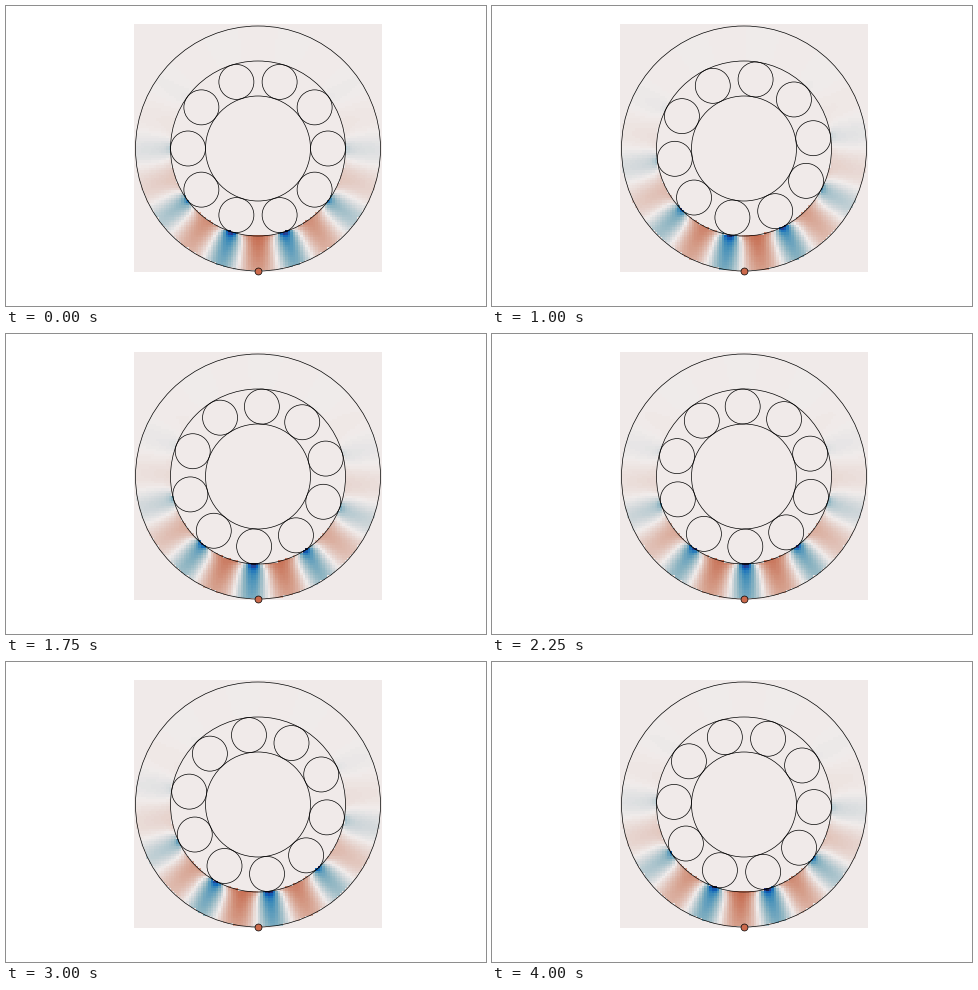
These frames come from a looping animation (480 px wide and 300 px high, 4.25 s). A matplotlib script:

```python
import numpy as np
import matplotlib.pyplot as plt
from matplotlib.animation import FuncAnimation
from matplotlib.colors import LinearSegmentedColormap
from matplotlib.patches import Circle

FRAMES, INTERVAL = 17, 250
BALLS = 10
R_IN, R_PITCH, R_RACE, R_OUT = 3, 4, 5, 7   # in ball radii
UNIT = 17.5                                 # pixels per ball radius
CX, CY = 252, 142.5                         # bearing centre in pixels
W, H = 480, 300
N = 100

STOPS = [
    (0, (23, 28, 66)), (1, (41, 58, 143)), (2, (11, 102, 189)),
    (3, (69, 144, 185)), (4, (142, 181, 194)), (5, (210, 216, 219)),
    (5.5, (241, 236, 235)), (6, (230, 210, 204)), (7, (213, 157, 137)),
    (8, (196, 101, 72)), (9, (172, 43, 36)), (10, (120, 14, 40)),
    (11, (60, 9, 17)),
]
balance = LinearSegmentedColormap.from_list(
    "balance", [(p / 11, [c / 255 for c in rgb]) for p, rgb in STOPS], N=256)

axis = np.linspace(-R_OUT, R_OUT, N)
X, Y = np.meshgrid(axis, axis)
R, THETA = np.hypot(X, Y), np.arctan2(Y, X)
RING = (R >= R_RACE) & (R <= R_OUT)
DEPTH = np.clip((R - R_RACE) / (R_OUT - R_RACE), 0, 1)

# load zone centred on the bottom of the outer ring
FROM_BOTTOM = np.degrees(np.arctan2(X, -Y))
LOAD = np.exp(-0.5 * (FROM_BOTTOM / 46) ** 2)
AMP = (0.43 - 0.16 * DEPTH) * LOAD
PEAK = 0.1 + 0.42 * np.exp(-DEPTH / 0.12)   # sharpness near the contact


def strain(phase):
    c = np.cos(BALLS * (THETA - phase))
    wave = (1 + PEAK) * (c - PEAK) / (1 - 2 * PEAK * c + PEAK ** 2)
    return np.where(RING, -AMP * wave, 0)


fig = plt.figure(figsize=(W / 100, H / 100), dpi=100, facecolor="white")
ax = fig.add_axes([0, 0, 1, 1])
ax.axis("off")

half = R_OUT * N / (N - 1)
field = ax.imshow(strain(0), cmap=balance, vmin=-1, vmax=1, origin="lower",
                  extent=(-half, half, -half, half), aspect="auto",
                  interpolation="nearest")
ax.set_xlim(-CX / UNIT, (W - CX) / UNIT)
ax.set_ylim((CY - H) / UNIT, CY / UNIT)


def ring(radius):
    return ax.add_patch(Circle((0, 0), radius, fill=False, ec="black", lw=0.5))


for radius in (R_IN, R_RACE, R_OUT):
    ring(radius)
balls = [ring(1) for _ in range(BALLS)]
ax.plot(0, -R_OUT, "o", ms=5, mfc="#cb6a4c", mec="black", mew=0.5,
        clip_on=False, zorder=5)


def update(i):
    phase = 2 * np.pi / BALLS * i / FRAMES
    field.set_data(strain(phase))
    for k, ball in enumerate(balls):
        a = phase + 2 * np.pi * k / BALLS
        ball.center = R_PITCH * np.cos(a), R_PITCH * np.sin(a)
    return [field, *balls]


anim = FuncAnimation(fig, update, frames=FRAMES, interval=INTERVAL,
                     repeat=True, repeat_delay=0)
plt.show()
```
